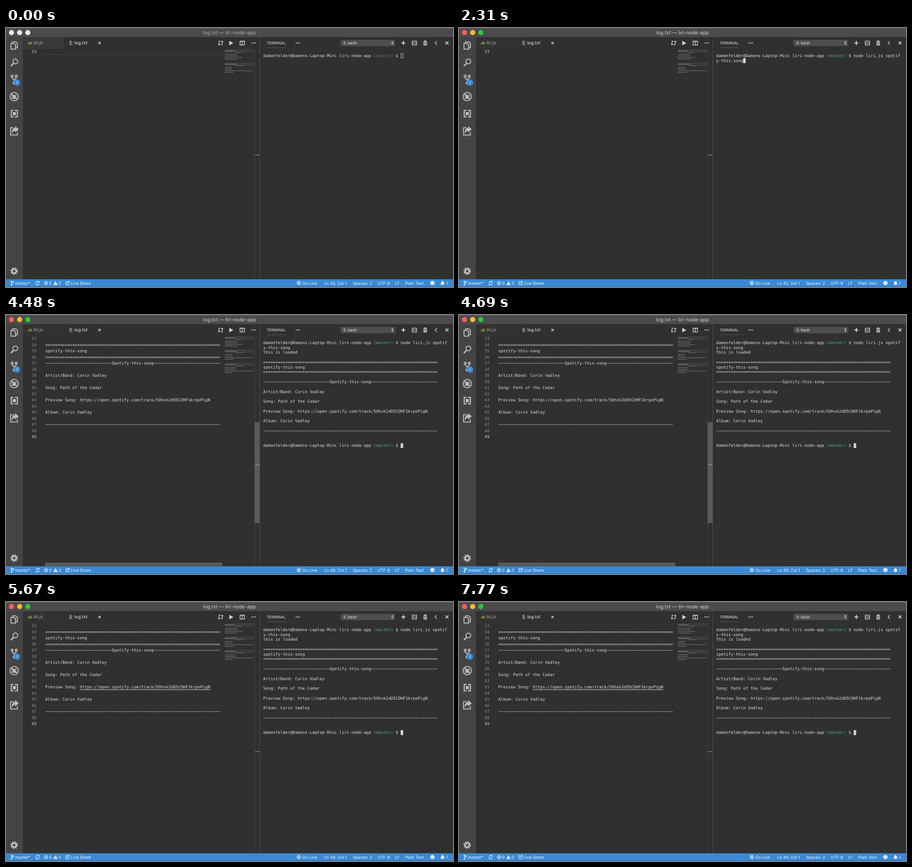
Recreate the animation shown at these times as an HTML page. Size 982 by 570 pixels, loop 7.84 s.

```html
<!DOCTYPE html>
<html lang="en">
<head>
<meta charset="utf-8">
<title>log.txt — liri-node-app</title>
<style>
  html, body { margin: 0; width: 100%; height: 100%; overflow: hidden; background: #303030; }
  svg { display: block; width: 982px; height: 570px; }
  text { font: 9px Inter, "Open Sans", sans-serif; fill: #d4d4d4; white-space: pre; text-rendering: geometricPrecision; }
  #terminal text { font: 8.96px "DejaVu Sans Mono", monospace; fill: #dedede; }
  #editor text { font: 8.99px "DejaVu Sans Mono", monospace; fill: #dedede; }
  #editor .number { fill: #8c8c8c; }
  #editor .current { fill: #c8c8c8; }
  #status text { fill: #f4f8fc; }
  .line { fill: none; stroke: #bdbdbd; stroke-width: 2; }
  .fill { fill: #bdbdbd; }
  .tool { fill: none; stroke: #cfcfcf; stroke-width: 1.4; }
  .toolFill { fill: #cfcfcf; }
  .white { fill: none; stroke: #f4f8fc; stroke-width: 1.1; }
  .whiteFill { fill: #f4f8fc; }
</style>
</head>
<body>
<svg viewBox="0 0 982 570">
  <rect width="982" height="570" fill="#303030"/>

  <g id="titlebar">
    <rect width="982" height="20" fill="#4b4b4b"/>
    <rect width="982" height="1" fill="#686868"/>
    <circle cx="12" cy="10" r="5.7"/><circle cx="30" cy="10" r="5.7"/><circle cx="48" cy="10" r="5.7"/>
    <text id="title" x="491" y="13.6" text-anchor="middle" style="font-size:10.8px">log.txt — liri-node-app</text>
  </g>

  <g id="activity">
    <rect y="20" width="37" height="533" fill="#444"/>
    <path class="line" d="M14.5 33V30.5H21.5L25 34V43.5H22M11 34H18L21 37V46.5H11Z"/>
    <circle class="line" cx="20.5" cy="73.5" r="5.3"/>
    <path class="line" d="M17 77.5L10.5 84" style="stroke-width:3"/>
    <g class="line">
      <circle cx="13.5" cy="106" r="2.2"/><circle cx="22.5" cy="106" r="2.2"/><circle cx="18" cy="121" r="2.2"/>
      <path d="M13.5 108V110L18 114.5V119M22.5 108V110L18 114.5"/>
    </g>
    <circle cx="24" cy="120" r="7" fill="#3a8ad8"/>
    <text x="24" y="122.7" text-anchor="middle" style="font-size:7.5px;fill:#fff">1</text>
    <circle class="line" cx="18" cy="151" r="9.2"/>
    <ellipse class="fill" cx="18" cy="152" rx="3.4" ry="4.4"/>
    <path class="line" style="stroke-width:1.2" d="M12 148L24 156M12 156L24 148M11.5 152H24.5M16 148L14.5 145M20 148L21.5 145"/>
    <path class="line" d="M11.5 144.5L24.5 157.5"/>
    <path class="line" style="stroke-width:2.4" d="M16.5 181.5H11.5V195.5H16.5M19.5 181.5H25V195.5H19.5"/>
    <rect class="fill" x="14.8" y="185" width="6.8" height="7"/>
    <path class="line" d="M17 219.5H10V235.5H25V229.5"/>
    <path class="fill" d="M20 216L28 223L20 230V226.2C16.5 226.2 14.5 228.5 13 233C11.8 225.5 15 220.3 20 219.8Z"/>
    <circle class="line" cx="18" cy="535" r="7" style="stroke-width:3" stroke-dasharray="2.75 2.75"/>
    <circle class="line" cx="18" cy="535" r="4.5" style="stroke-width:3.6"/>
  </g>

  <g id="tabs">
    <rect id="idleTab" x="37" y="20" width="89" height="26"/>
    <text x="47.5" y="35.5" style="font-size:7.6px;font-weight:700;fill:#cbcb41">JS</text>
    <text x="60" y="36.3" style="font-size:9.9px;font-style:italic;fill:#b0b0b0">liri.js</text>
    <path class="tool" style="stroke-width:1.1" d="M139 29H144M139 31.5H146M139 34H144M139 36.5H146"/>
    <text x="150" y="36.3" style="font-size:9.8px;fill:#ececec">log.txt</text>
    <path class="tool" style="stroke-width:1.6" d="M203 30.5L208 35.5M208 30.5L203 35.5"/>
    <path class="tool" d="M471.5 29H468V36.5M466 35L468 37.3L470 35M471.5 37H475V29.5M473 31L475 28.7L477 31"/>
    <path class="toolFill" d="M490.5 28.2L499.5 33.2L490.5 38.2Z"/>
    <path class="tool" d="M514.2 29H524V37.5H514.2ZM519 29V37.5M514 29.5H524"/>
    <g class="toolFill"><circle cx="540.5" cy="33" r="1.2"/><circle cx="544" cy="33" r="1.2"/><circle cx="547.5" cy="33" r="1.2"/></g>
  </g>

  <g id="panelHeader">
    <text x="572.5" y="35.6" style="font-size:8.25px;fill:#e4e4e4">TERMINAL</text>
    <rect x="573" y="43" width="42" height="1" fill="#575757"/>
    <g class="toolFill"><circle cx="637.5" cy="33" r="1.2"/><circle cx="641" cy="33" r="1.2"/><circle cx="644.5" cy="33" r="1.2"/></g>
    <rect x="735" y="26" width="120" height="14" rx="2.5" fill="#4e4e4e"/>
    <text id="shell" x="741" y="36.1" style="font-size:8.6px;fill:#ececec"></text>
    <path class="toolFill" d="M846.3 32L848.8 28.8L851.3 32ZM846.3 33.8L848.8 37L851.3 33.8Z"/>
    <path class="tool" style="stroke-width:2.2" d="M868.5 33H877.5M873 28.5V37.5"/>
    <path class="tool" d="M892.5 29H902V37.5H892.5ZM892 33.2H902"/>
    <path class="tool" d="M917 30H925M919.5 29.5V28.3H922.5V29.5M918 31V37.8H924V31M920 32V36.5M922 32V36.5"/>
    <path class="tool" d="M946.5 29L942.5 33L946.5 37"/>
    <path class="tool" style="stroke-width:1.7" d="M965.5 29.7L972 36.2M972 29.7L965.5 36.2"/>
  </g>

  <rect x="546" y="46" width="1" height="507" fill="#434343"/>
  <rect x="557" y="20" width="1" height="533" fill="#4c4c4c"/>
  <path id="lineFrame" d="M87.5 51V58.5H477" fill="none" stroke="#434343"/>
  <g id="editor"></g>
  <g id="minimap"></g>
  <g id="scrollbars" fill="#5a5a5a">
    <rect x="546" y="236" width="11" height="222"/>
    <rect x="86" y="545" width="389" height="7.5"/>
  </g>
  <rect id="marker" x="547" width="10" height="1" fill="#a8a8a8"/>
  <g id="terminal"></g>

  <g id="status">
    <rect y="553" width="982" height="17" fill="#3989d6"/>
    <rect y="569" width="982" height="1" fill="#2f6ca8"/>
    <g class="white">
      <circle cx="12" cy="558" r="1.2"/><circle cx="16" cy="559" r="1.2"/><circle cx="12" cy="565.5" r="1.2"/>
      <path d="M12 559.2V564.3M16 560.2C16 562.5 12 561.5 12 564"/>
      <path d="M66 561A3.6 3.6 0 0 1 72.6 559.3M73.2 562A3.6 3.6 0 0 1 66.6 563.8M73 557V559.8H70.5M66.2 566V563.3H68.7"/>
      <circle cx="87.8" cy="561.5" r="3.7"/><path d="M86.2 559.9L89.4 563.1M89.4 559.9L86.2 563.1"/>
      <path d="M135 558H131.7V565H138.5V562.5M134 562.5L138.5 558M135.8 557.5H139V560.8"/>
      <circle cx="643.3" cy="561" r="4"/><circle cx="643.3" cy="561" r="1.7"/><path d="M643.3 561V566"/>
    </g>
    <path class="whiteFill" d="M108.7 557L113.3 565.5H104.1Z"/>
    <path d="M108.7 559.7V562.7M108.7 563.5V564.6" stroke="#3989d6"/>
    <circle class="whiteFill" cx="936.8" cy="561.4" r="4.7"/>
    <path d="M934 562.3Q936.8 566 939.6 562.3M935 559V560.5M938.6 559V560.5" fill="none" stroke="#3989d6"/>
    <path class="whiteFill" d="M954.5 564.5C956.5 562.5 955.5 557.5 959 557C962.5 557.5 961.5 562.5 963.5 564.5ZM957.5 565H960.5L959 566.5Z"/>
    <text x="20" y="564.7">master*</text>
    <text x="94.5" y="564.7">0</text>
    <text x="115.5" y="564.7">0</text>
    <text x="142" y="564.7">Live Share</text>
    <text x="651.3" y="564.7">Go Live</text>
    <text id="position" x="699" y="564.7"></text>
    <text x="762" y="564.7">Spaces: 2</text>
    <text x="816" y="564.7">UTF-8</text>
    <text x="854.5" y="564.7">LF</text>
    <text x="876.7" y="564.7">Plain Text</text>
    <text x="966.5" y="564.7">1</text>
  </g>
</svg>
<script>
const LOOP = 7840, STEP = 70;
const FOCUS = 70, ENTER = 2660, RUNNING = 2730, LOADED = 3220, HEADING = 3780;
const RESULT = 4200, FINISHED = 4270, LOGGED = 4340, LINKED = 5040;
const FADE_START = 4900, FADE_END = 5600;
const CELL = 5.394, ROW = 10.78;

const PROMPT = 'damonfelder@Damons-Laptop-Mini liri-node-app ';
const COMMAND = 'node liri.js spotify-this-song';
const FIRST_ROW = 19;
const URL_TEXT = 'https://open.spotify.com/track/5Ohxk2dO5COHF1krpoPigN';
// wide dashes, so that the rules look almost unbroken
const RULE = '='.repeat(71), DASHES = '−'.repeat(71), SIDE = '−'.repeat(27);
const HEADER = [RULE, 'spotify-this-song', RULE];
const SONG = [
  SIDE + 'Spotify-this-song' + SIDE, '',
  'Artist/Band: Corin Vadley', '',
  'Song: Path of the Cedar', '',
  'Preview Song: ' + URL_TEXT, '',
  'Album: Corin Vadley', '', DASHES
];
// time, characters typed
const TYPING = [[770, 0], [1190, 9], [1330, 10], [1890, 25], [2100, 25], [2310, 30]];

const $ = id => document.getElementById(id);
const lights = document.querySelectorAll('#titlebar circle');

function typedCount(t) {
  if (t <= TYPING[0][0]) return 0;
  for (let i = 1; i < TYPING.length; i++) {
    const [t0, n0] = TYPING[i - 1], [t1, n1] = TYPING[i];
    if (t <= t1) return Math.round(n0 + (n1 - n0) * (t - t0) / (t1 - t0));
  }
  return COMMAND.length;
}

function terminalMarkup(t) {
  const focused = t >= FOCUS;
  const green = focused ? '#48ad89' : '#438a70';
  const prompt = `${PROMPT}<tspan fill="${green}">(master)</tspan> $ `;
  const promptLength = PROMPT.length + 11;
  const typed = COMMAND.slice(0, typedCount(t));
  const rows = [prompt + typed.slice(0, FIRST_ROW), typed.slice(FIRST_ROW)];
  let column = typed.length < FIRST_ROW ? promptLength + typed.length : typed.length - FIRST_ROW;
  let row = typed.length < FIRST_ROW ? 0 : 1;

  if (t >= ENTER) [row, column] = [2, 0];
  if (t >= LOADED) { rows.push('this is loaded'); row = 3; }
  if (t >= HEADING) { rows.push('', ...HEADER); row = 7; }
  if (t >= RESULT) { rows.push('', ...SONG, '', ''); row = 20; }
  if (t >= FINISHED) { rows.push(prompt); [row, column] = [21, promptLength]; }

  const text = rows.map((line, i) => `<text x="565" y="${63.8 + i * ROW}">${line}</text>`).join('');
  const x = 565 + column * CELL, y = 55.8 + row * ROW;
  return text + (focused
    ? `<rect x="${x}" y="${y}" width="5.4" height="10.7" fill="#d8d8d8"/>`
    : `<rect x="${x + .5}" y="${y + .5}" width="4.6" height="9.7" fill="none" stroke="#c8c8c8"/>`);
}

function editorMarkup(t) {
  const rows = t < LOGGED ? [''] : ['', ...HEADER, ...SONG, '', ''];
  const last = rows.length - 1;
  const text = rows.map((line, i) => {
    const y = 55.1 + i * 13.5;
    return `<text class="${i === last ? 'current' : 'number'}" x="56" y="${y}">${33 + i}</text>` +
      `<text x="86.2" y="${y}">${line}</text>`;
  }).join('');
  return text + (t >= LINKED ? '<rect x="162" y="192.5" width="287" height="1" fill="#dedede"/>' : '');
}

function minimapMarkup(t) {
  const blocks = [[23, 12, 27, 28, 38, 27], [27, 17, 16, 16, 61, 19]];
  if (t >= LOGGED) blocks.push([23, 17, 24, 24, 62, 17]);
  const stroke = (x, y, width, color, dash) =>
    `<path d="M${x} ${y}h${width}" stroke="${color}" stroke-width=".9" stroke-dasharray="${dash}"/>`;
  return blocks.map(([command, heading, ...details], i) => {
    const y = 48.6 + i * 29.1;
    return stroke(481, y, 64, '#626262', 'none') + stroke(481, y + 1.9, command, '#bbb', '1.6 .6') +
      stroke(481, y + 3.7, 64, '#626262', 'none') + stroke(505, y + 5.5, heading, '#999', '1.4 .7') +
      details.map((width, k) => stroke(481, y + 9.1 + k * 3.6, width, '#c0c0c0', '1.3 .9')).join('');
  }).join('');
}

const shown = {};
function setMarkup(id, markup) {
  if (shown[id] !== markup) $(id).innerHTML = shown[id] = markup;
}

function draw() {
  const t = Math.floor(performance.now() % LOOP / STEP) * STEP;
  const focused = t >= FOCUS, logged = t >= LOGGED;

  const colors = focused ? ['#f95f57', '#fdbc2f', '#2bc840'] : Array(3).fill('#e9e9e9');
  lights.forEach((light, i) => light.setAttribute('fill', colors[i]));
  $('title').style.fill = focused ? '#d0d0d0' : '#a9a9a9';
  $('idleTab').setAttribute('fill', focused ? '#323232' : '#393939');
  $('lineFrame').setAttribute('opacity', focused ? 0 : 1);

  setMarkup('shell', t >= RUNNING && t < FINISHED ? '5: node' : '5: bash');
  setMarkup('position', `Ln ${logged ? 49 : 33}, Col 1`);
  setMarkup('terminal', terminalMarkup(t));
  setMarkup('editor', editorMarkup(t));
  setMarkup('minimap', minimapMarkup(t));

  const fade = Math.max(0, Math.min(1, (FADE_END - t) / (FADE_END - FADE_START)));
  $('scrollbars').setAttribute('opacity', logged ? fade : 0);
  $('marker').setAttribute('y', logged ? 329 : 279);
  requestAnimationFrame(draw);
}
draw();
</script>
</body>
</html>
```
